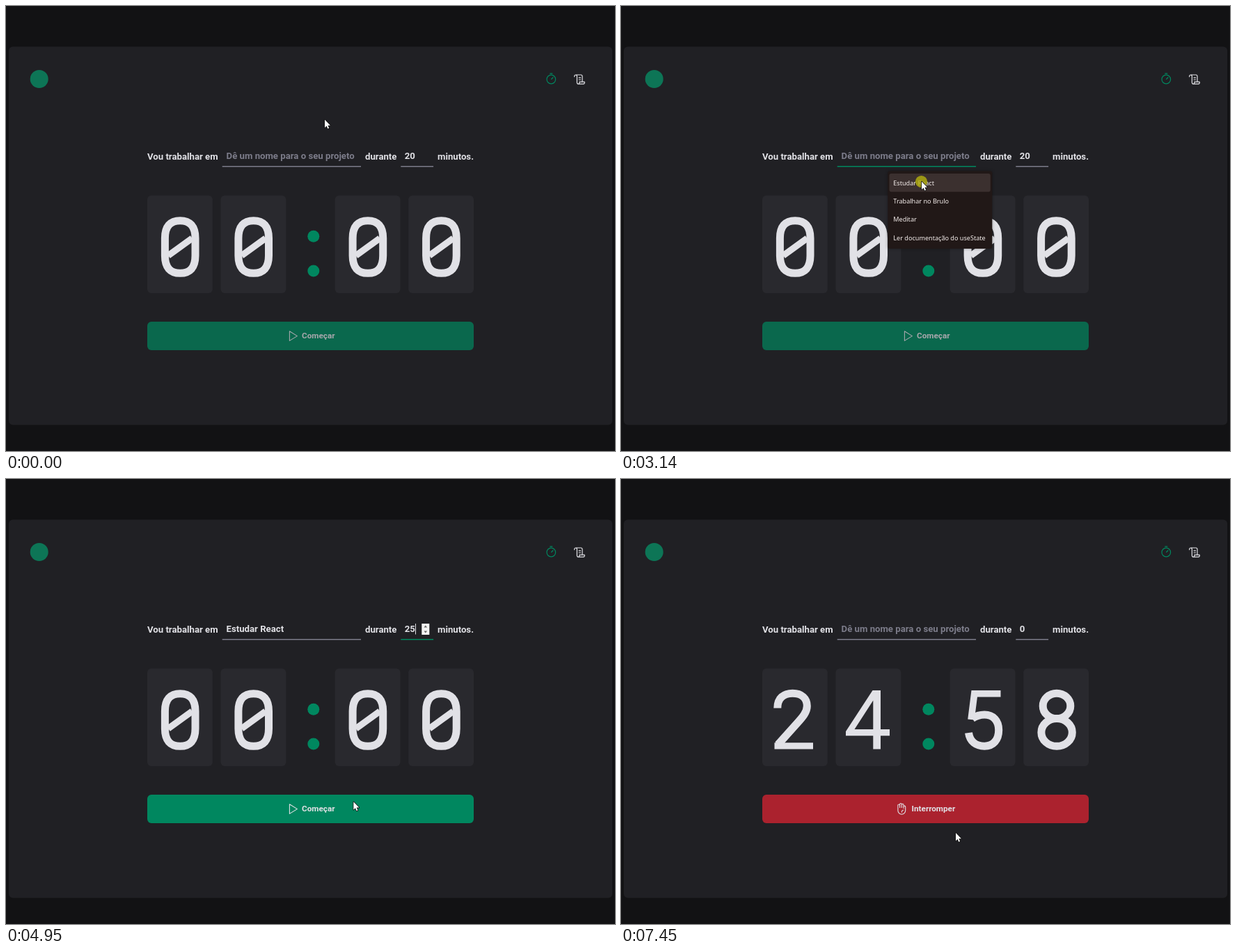
These frames come from a looping animation (875x640 px, 8000 ms). An HTML page with a canvas:

```html
<!DOCTYPE html>
<html lang="pt-BR">
<head>
<meta charset="utf-8">
<title>Timer</title>
<style>
  html, body { margin: 0; width: 100%; height: 100%; overflow: hidden; background: #121214; }
  canvas { display: block; width: 875px; height: 640px; }
</style>
</head>
<body>
<canvas id="stage" width="875" height="640"></canvas>
<script>
const ctx = document.getElementById('stage').getContext('2d');
const LOOP = 8000;
const color = {
  page: '#121214', card: '#202024', panel: '#29292e', text: '#e1e1e6', muted: '#7c7c8a',
  green: '#00875f', greenHover: '#015f43', greenOff: '#0a684d', textOff: '#a7a7ac',
  red: '#ab222e', redHover: '#7a1921', menu: '#211817', menuHover: '#3b302f'
};
const font = {
  form: 'bold 13.18px Roboto, sans-serif',
  button: 'bold 11.72px Roboto, sans-serif',
  menu: '500 9.1px "Noto Sans", sans-serif'
};
const suggestions = ['Estudar React', 'Trabalhar no Brulo', 'Meditar', 'Ler documentação do useState'];

// Moments of the interaction, in ms
const at = {
  focusTask: 2200, menuOpen: 2270, hoverItem: 2730, pick: 3270,
  focusMinutes: 4080, erase: 4480, retype: 4680,
  hoverButton: 5020, press: 5230, start: 5420, tick1: 6430, leaveButton: 6840, tick2: 7450
};
const clicks = [[2200, 2330], [3140, 3270], [4080, 4210], [5230, 5420]];

// Pointer keys: time, x, y
const track = [
  [690, 458, 163.5], [1460, 452, 211], [1530, 451, 213], [1650, 448.8, 217.5],
  [2530, 448.8, 217.5], [2870, 432, 252.5], [3270, 432, 252.5], [3480, 473, 243.5],
  [3880, 573, 213], [4010, 585, 217], [4810, 585, 217], [4950, 499.5, 464],
  [5030, 487, 489], [5160, 480.5, 475], [6700, 480.5, 475], [7050, 481, 509]
];

const glyphs = {
  0: 'M25.4 62C25.4 45 33 36.7 47.2 36.7S69 45 69 62V87C69 104 61.5 112.3 47.2 112.3S25.4 104 25.4 87Z',
  2: 'M21.8 57.5C21.8 43 31 36.2 43.5 36.2C56.5 36.2 64.3 43.5 64.3 54.5C64.3 63 58.5 70 50.5 78.8L22.5 110',
  4: 'M14.5 91L53 32H64.5V88H77.5V97.2H64.5V116.5H53.8V97.2H14.5ZM27 88H53.8V46.5Z',
  5: 'M32 72.5C37 69 42.5 67 49.5 67C62 67 70 75.5 70 89C70 103.5 62 112.2 49.5 112.2C37.5 112.2 28.5 105.5 26.8 93',
  8: 'M28 54.4a19.8 18.2 0 1 1 39.6 0a19.8 18.2 0 1 1-39.6 0ZM25.7 92.4a22.2 19.9 0 1 1 44.4 0a22.2 19.9 0 1 1-44.4 0Z',
  9: 'M68.3 67C63 76 56 81.5 47 81.5C34 81.5 25.5 72 25.5 59.5C25.5 46 34 36.3 47 36.3C60.5 36.3 68.5 47 68.5 62V68C68.5 97 56 111.5 31 111.5'
};
const details = {
  0: ['M30 87L64.5 62', 9.5],
  2: ['M17.5 111.9H73', 9.2],
  5: ['M72.8 36.8H35L30.3 74', 9.6]
};
const icons = {
  play: 'M407.4 467.8V481.4L418.4 474.6Z',
  hand: 'M397.9 473V476.8A5.4 5.4 0 0 0 408.7 476.8V471.5a1.35 1.35 0 0 0-2.7 0V474M406 472.5V468.6a1.35 1.35 0 0 0-2.7 0V473'
    + 'M403.3 472.5V467.8a1.35 1.35 0 0 0-2.7 0V473M400.6 472.5V469.4a1.35 1.35 0 0 0-2.7 0V474M403.4 479.6A3.4 3.4 0 0 1 406.2 476',
  timer: 'M777 105.5a6.3 6.3 0 1 1 12.6 0a6.3 6.3 0 1 1-12.6 0M783.3 105.5L786.3 102.5M781.3 97.2H785.3',
  scroll: 'M817 102.2A1.9 1.9 0 1 1 820.4 100.9V110A2.1 2.1 0 0 0 822.4 112.2H829.4A2.1 2.1 0 0 0 831.2 109.2H823.8'
    + 'A2.1 2.1 0 0 1 822.4 112.2M818.5 99H826A1.9 1.9 0 0 1 828 101V109M822.6 103.2h3.4M822.6 106h3.4'
};
const pointers = {
  arrow: 'M0 0V11.4L2.6 9L4.3 12.9L6.1 12.1L4.4 8.3H8Z',
  hand: 'M-1.4 1.4a1.4 1.4 0 1 1 2.8 0V5.6l4.6 1q1.5.4 1.2 2l-.7 3.2q-.2.8-.8 1.4V15.2H-.4V13.6L-3.8 9.5q-.8-1.2.2-1.9q.9-.5 2.2.8Z',
  beam: 'M-2.2-5.5H-.5L0-5L.5-5.5H2.2M0-5V5M-2.2 5.5H-.5L0 5L.5 5.5H2.2'
};

function rect(x, y, w, h, fill, radius = 0) {
  ctx.fillStyle = fill;
  ctx.beginPath();
  ctx.roundRect(x, y, w, h, radius);
  ctx.fill();
}
function circle(x, y, r, fill) {
  ctx.fillStyle = fill;
  ctx.beginPath();
  ctx.arc(x, y, r, 0, Math.PI * 2);
  ctx.fill();
}
function text(value, x, y, face, fill = color.text) {
  ctx.font = face;
  ctx.fillStyle = fill;
  ctx.fillText(value, x, y);
}
function stroke(path, paint, width, join = 'round') {
  ctx.strokeStyle = paint;
  ctx.lineWidth = width;
  ctx.lineJoin = join;
  ctx.stroke(new Path2D(path));
}

const between = (t, from, to) => t >= from && t < to;
const caretOn = (t, since) => Math.floor((t - since) / 500) % 2 === 0;

function pointerAt(t) {
  const next = track.findIndex(key => key[0] > t);
  if (next === 0) return track[0].slice(1);
  if (next < 0) return track[track.length - 1].slice(1);
  const [t0, x0, y0] = track[next - 1];
  const [t1, x1, y1] = track[next];
  const k = (t - t0) / (t1 - t0);
  return [x0 + (x1 - x0) * k, y0 + (y1 - y0) * k];
}

function drawDigit(digit, x) {
  rect(x, 272.4, 93.8, 140.6, color.panel, 5.9);
  ctx.save();
  ctx.translate(x, 272);
  if (digit === '4') {
    ctx.fillStyle = color.text;
    ctx.fill(new Path2D(glyphs[4]), 'evenodd');
  } else {
    stroke(glyphs[digit], color.text, 11);
    if (details[digit]) stroke(details[digit][0], color.text, details[digit][1], 'miter');
  }
  ctx.restore();
}

function drawClock(t) {
  const time = t < at.start ? '0000' : t < at.tick1 ? '2500' : t < at.tick2 ? '2459' : '2458';
  [203, 308.5, 472.7, 578.2].forEach((x, i) => drawDigit(time[i], x));
  circle(441.8, 331.2, 8.5, color.green);
  circle(441.8, 381, 8.5, color.green);
}

function drawForm(t) {
  const onTask = between(t, at.focusTask, at.focusMinutes);
  const onMinutes = between(t, at.focusMinutes, at.press);
  const filled = between(t, at.pick, at.start);
  const minutes = t >= at.start ? '0' : t >= at.retype ? '25' : t >= at.erase ? '2' : '20';

  text('Vou trabalhar em', 203, 221, font.form);
  text('durante', 516, 221, font.form);
  text('minutos.', 620, 221, font.form);
  text(filled ? suggestions[0] : 'Dê um nome para o seu projeto', 316.6, 220.4, font.form,
    filled ? color.text : color.muted);
  text(minutes, 572.8, 220.4, font.form);
  rect(310.7, 229.9, 199.3, 1.5, onTask ? color.green : color.muted);
  rect(567.3, 229.9, 46.8, 1.5, onMinutes ? color.green : color.muted);

  if (onTask && caretOn(t, filled ? at.pick : at.focusTask))
    rect(filled ? 398.7 : 316.4, 208, 1, 15.5, color.text);
  if (onMinutes) {
    const since = t >= at.retype ? at.retype : t >= at.erase ? at.erase : at.focusMinutes;
    if (caretOn(t, since)) rect(minutes.length > 1 ? 588 : 580.5, 208, 1, 15.5, color.text);
  }
  if (between(t, 3880, at.press)) {
    rect(597.3, 208, 11, 16, '#f4f4f4');
    ctx.fillStyle = '#666';
    ctx.fill(new Path2D('M600.4 213.6L602.8 210.6L605.2 213.6ZM600.4 218.6L602.8 221.6L605.2 218.6Z'));
  }
}

function drawButton(t) {
  const running = t >= at.start;
  const enabled = t >= at.pick;
  const hover = between(t, at.hoverButton, at.leaveButton);
  const fill = running ? (hover ? color.redHover : color.red)
    : !enabled ? color.greenOff : hover ? color.greenHover : color.green;
  const ink = enabled ? color.text : color.textOff;

  if (between(t, at.press, at.start)) rect(201.5, 452.5, 472, 44, color.green, 7.4);
  rect(203, 454, 469, 41, fill, 5.9);
  stroke(running ? icons.hand : icons.play, ink, 1.1);
  text(running ? 'Interromper' : 'Começar', running ? 417.6 : 425, 478.4, font.button, ink);
}

function drawMenu(t) {
  if (!between(t, at.menuOpen, at.pick)) return;
  ctx.save();
  ctx.shadowColor = 'rgba(0,0,0,.35)';
  ctx.shadowBlur = 4;
  rect(383.3, 237.5, 150, 111.5, color.menu, 3);
  ctx.restore();
  if (t >= at.hoverItem) rect(385.5, 241, 145.3, 26.3, color.menuHover, 3);
  suggestions.forEach((item, i) => text(item, 391.3, 257.5 + i * 26.4, font.menu, '#f5eeec'));
}

function drawPointer(t) {
  const [x, y] = pointerAt(t);
  if (clicks.some(([from, to]) => between(t, from, to)))
    circle(x - 0.5, y, 8.6, 'rgba(178,174,16,.82)');
  const overTask = x > 311 && x < 510 && y > 207 && y < 231;
  const overMinutes = x > 567 && x < 597 && y > 207 && y < 231;
  const kind = overTask || overMinutes ? 'beam'
    : between(t, at.hoverButton, at.leaveButton) ? 'hand' : 'arrow';
  ctx.save();
  ctx.translate(x, y);
  if (kind === 'beam') {
    stroke(pointers.beam, '#d8d8d8', 1);
  } else {
    stroke(pointers[kind], '#111', 1.6);
    ctx.fillStyle = '#fff';
    ctx.fill(new Path2D(pointers[kind]));
    if (kind === 'hand') stroke('M1.5 6V8.5M3.6 6.7V8.8M5.5 7.3V9.2', '#333', 0.6);
  }
  ctx.restore();
}

function frame(now) {
  const t = now % LOOP;
  rect(0, 0, 875, 640, color.page);
  rect(3.9, 58.6, 867.3, 543.8, color.card, 5.9);
  circle(47.7, 105, 13, '#0d7556');
  stroke(icons.timer, color.green, 1.2);
  stroke(icons.scroll, color.text, 1.2);
  drawForm(t);
  drawClock(t);
  drawButton(t);
  drawMenu(t);
  drawPointer(t);
  requestAnimationFrame(frame);
}
requestAnimationFrame(frame);
</script>
</body>
</html>
```
